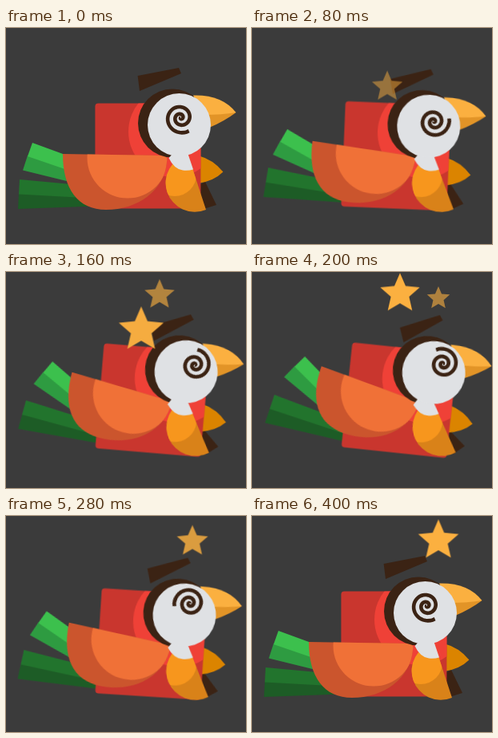
Animation of 300 by 271 pixels, one loop 440 ms. Source, as an HTML page:

```html
<!DOCTYPE html>
<html lang="en">
<head>
<meta charset="utf-8">
<title>Dizzy bird</title>
<style>
  html, body { margin: 0; width: 100%; height: 100%; overflow: hidden; background: #3b3b3b; }
  svg { display: block; width: 100%; height: 100%; }

  /* One loop is 11 ticks of 40 ms; 9.09% is one tick. */
  .tilt { animation: tilt 440ms steps(5) infinite; }
  @keyframes tilt {
    0%, 90.9%, 100% { transform: none; }
    45.45% { transform: var(--to); }
  }
  #spiral { transform-origin: 222.5px 111px; animation: spin 440ms steps(10) infinite; }
  @keyframes spin {
    0% { transform: rotate(0deg); }
    90.9%, 100% { transform: rotate(-360deg); }
  }

  .body { transform-origin: 177px 226px; --to: rotate(6deg); }
  .wing { transform-origin: 197px 163px; --to: translate(7px, 1.7px) rotate(19.4deg); }
  .feather1 { transform-origin: 131.8px 196.6px; --to: rotate(26deg); }
  .feather2 { transform-origin: 156px 213px; --to: rotate(15.3deg); }
  .foot { transform-origin: 253px 211px; --to: rotate(-18deg); }
  .jaw { transform-origin: 229px 163px; --to: translate(-2px, 1px) rotate(-6deg); }
  .brow { transform-origin: 216px 50px; --to: translate(18.8px, 4px) rotate(-6.5deg); }

  .star { fill: #fbb040; opacity: 0; animation: 440ms infinite; }
  .a { animation-name: starA; }
  .b { animation-name: starB; }
  .c { animation-name: starC; }
  @keyframes starA {
    0% { opacity: 0; transform: translate(169px, 74px) scale(1.55); animation-timing-function: step-end; }
    9.09% { opacity: .25; transform: translate(169px, 74px) scale(1.55); animation-timing-function: steps(3); }
    36.36% { opacity: .97; transform: translate(169px, 72.7px) scale(2.95); animation-timing-function: step-end; }
    45.45%, 100% { opacity: 0; transform: translate(169px, 72.7px) scale(2.95); }
  }
  @keyframes starB {
    0% { opacity: 0; transform: translate(199px, 30px) scale(1.35); animation-timing-function: step-end; }
    27.27% { opacity: .25; transform: translate(199px, 30px) scale(1.35); animation-timing-function: steps(2); }
    45.45% { opacity: 1; transform: translate(185px, 27.3px) scale(2.6); animation-timing-function: step-end; }
    54.54%, 100% { opacity: 0; transform: translate(185px, 27.3px) scale(2.6); }
  }
  @keyframes starC {
    0% { opacity: 0; transform: translate(233px, 33px) scale(1.5); animation-timing-function: step-end; }
    45.45% { opacity: .6; transform: translate(233px, 33px) scale(1.5); animation-timing-function: steps(3); }
    72.72% { opacity: .95; transform: translate(233px, 31.2px) scale(2.32); animation-timing-function: steps(2); }
    90.9%, 100% { opacity: 1; transform: translate(233px, 30.8px) scale(2.66); }
  }
</style>
</head>
<body>
<svg viewBox="0 0 300 271" preserveAspectRatio="none">
  <defs>
    <polygon id="star" points="0,-10 2.7,-3.72 9.51,-3.09 4.37,1.42 5.88,8.09 0,4.6 -5.88,8.09 -4.37,1.42 -9.51,-3.09 -2.7,-3.72"/>
    <rect id="torso" x="111.4" y="94.4" width="132" height="132" rx="4"/>
    <path id="wing" d="M71 158L194 160Q203 160 201 168C198 204 165 228 125 228C90 228 71 202 71 158Z"/>
    <path id="jaw" d="M227.5 159L250 228A36.4 36.4 0 1 1 227.5 159Z"/>
    <clipPath id="inTorso"><use href="#torso"/></clipPath>
    <clipPath id="inWing"><use href="#wing"/></clipPath>
    <clipPath id="inJaw"><use href="#jaw"/></clipPath>
  </defs>

  <g class="tilt feather2">
    <path fill="#1d5c26" d="M16 208L15 227L125 223V206Z"/>
    <path fill="#22742d" d="M17 190L16 208.5L125 214.5V200Z"/>
  </g>
  <g class="tilt feather1">
    <path fill="#2e9b41" d="M27 160L21 178.5L120 203V190Z"/>
    <path fill="#3cc04d" d="M33 144L27 161L120 193V176Z"/>
  </g>

  <path class="tilt foot" fill="#3b2314" d="M241 197L249 193L263 222L247 227Z"/>

  <g class="tilt body">
    <path fill="#db8400" d="M240 160Q259 165 271.4 180.5Q260 192 240 195Z"/>
    <use href="#torso" fill="#c9362e"/>
    <circle cx="210" cy="130" r="57" fill="#ef4137" clip-path="url(#inTorso)"/>
  </g>

  <g class="tilt wing">
    <use href="#wing" fill="#cb552d"/>
    <circle cx="152" cy="163" r="50.5" fill="#f07137" clip-path="url(#inWing)"/>
  </g>

  <g class="tilt body">
    <circle cx="208" cy="119.5" r="43" fill="#3b2314"/>
  </g>

  <g class="tilt jaw">
    <use href="#jaw" fill="#d98219"/>
    <circle cx="211" cy="184" r="27" fill="#f7961d" clip-path="url(#inJaw)"/>
    <path fill="#dfe1e4" d="M203.5 163Q210 177 221 178.5Q228 179.3 234 177.5L227.5 158L212 154Z"/>
  </g>

  <g class="tilt body">
    <path fill="#e29427" d="M246 104L287.5 106Q273 117 254 125Z"/>
    <path fill="#fbb040" d="M234 84.5Q270 83.5 287.5 106Q270 109 246 109Z"/>
    <circle cx="216.5" cy="121.6" r="39.5" fill="#dfe1e4"/>
    <path id="spiral" fill="none" stroke="#3b2314" stroke-width="4.6"/>
  </g>

  <path class="tilt brow" fill="#3b2314" d="M164.6 60L216 50L219 57L167 79Z"/>

  <use href="#star" class="star a"/>
  <use href="#star" class="star b"/>
  <use href="#star" class="star c"/>
</svg>
<script>
  // Spiral from its outer end inwards, coiling tighter near the centre.
  const cx = 218.3, cy = 112.7, radius = 19.5, turns = 2.3, start = 58 * Math.PI / 180;
  const steps = 90;
  let d = '';
  for (let i = 0; i <= steps; i++) {
    const u = i / steps;
    const angle = start + u * turns * 2 * Math.PI;
    const r = radius * (1 - u) ** 1.2;
    const x = cx + r * Math.cos(angle), y = cy + r * Math.sin(angle);
    d += (i ? 'L' : 'M') + x.toFixed(2) + ' ' + y.toFixed(2);
  }
  document.getElementById('spiral').setAttribute('d', d);
</script>
</body>
</html>
```
